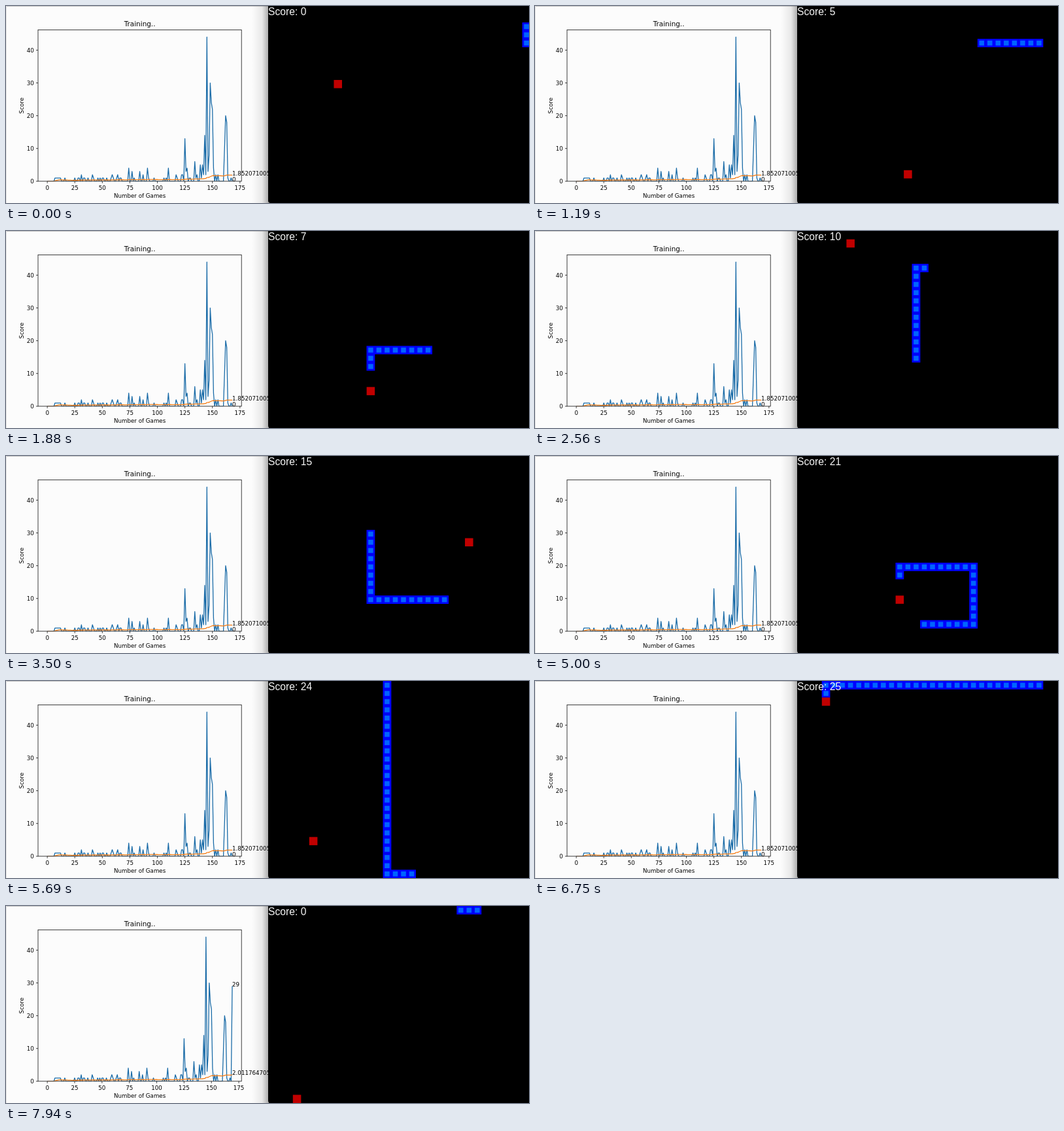
Animation of 800 by 301 pixels, one loop 8000 ms. Source, as an HTML page with a canvas:

```html
<!DOCTYPE html>
<html lang="en">
<head>
<meta charset="utf-8">
<title>Snake training</title>
<style>
  html, body { margin: 0; width: 100%; height: 100%; overflow: hidden; background: #fcfcfc; }
  canvas { display: block; width: 800px; height: 301px; }
</style>
</head>
<body>
<canvas id="stage" width="800" height="301"></canvas>
<script>
const ctx = document.getElementById('stage').getContext('2d');
const LOOP = 8000, FRAME = 62.5;
const CHART_UPDATE = 121, RESTART = 122;
const BOARD_X = 401.2, CELL = 12.535;
const AXES = { left: 49, right: 360.2, top: 36.4, bottom: 267.8 };
const SANS = '"DejaVu Sans", sans-serif';

// Scores of past games: value -> game numbers; all other games scored 0.
const SCORES = {
  1: [7, 8, 9, 10, 11, 12, 16, 25, 28, 29, 33, 34, 37, 42, 46, 48, 50, 51, 54, 58, 60, 63, 66, 67,
      79, 92, 97, 106, 108, 118, 129, 130, 135, 140, 164, 167],
  2: [31, 41, 59, 64, 87, 117, 122, 123, 136, 142, 144, 153, 155],
  3: [77, 84, 126, 146], 4: [74, 91, 110, 127, 151], 5: [139, 141], 6: [134], 8: [147],
  10: [161], 13: [125], 14: [143], 18: [163], 20: [162], 22: [150], 24: [149], 30: [148], 44: [145]
};
const history = Array(169).fill(0);
for (const [score, games] of Object.entries(SCORES)) games.forEach(g => history[g] = +score);

const DIRS = { L: [-1, 0], R: [1, 0], U: [0, -1], D: [0, 1] };

// Each run is [frames, moves]; "D7*" means seven cells down, then food.
function makeGame(body, runs, ahead) {
  const cells = [...body], meals = [], keys = [[0, cells.length - 1]];
  const follow = moves => moves.split(' ').forEach(move => {
    const [dx, dy] = DIRS[move[0]];
    for (let n = parseInt(move.slice(1)); n > 0; n--) {
      const [x, y] = cells[cells.length - 1];
      cells.push([x + dx, y + dy]);
    }
    if (move.endsWith('*')) meals.push(cells.length - 1);
  });
  for (const [frames, moves] of runs) {
    follow(moves);
    keys.push([keys[keys.length - 1][0] + frames, cells.length - 1]);
  }
  follow(ahead);

  return frame => {
    let head = keys[keys.length - 1][1];
    const next = keys.findIndex(([f]) => f > frame);
    if (next > 0) {
      const [f0, s0] = keys[next - 1], [f1, s1] = keys[next];
      head = s0 + Math.floor((s1 - s0) * (frame - f0) / (f1 - f0));
    }
    const score = meals.filter(m => m <= head).length;
    return {
      score,
      snake: cells.slice(head - score - 2, head + 1),
      food: cells[meals.find(m => m > head)]
    };
  };
}

const longGame = makeGame([[31, 4], [31, 3], [31, 2]], [
  [19, 'L23 D7* D5 R10* R6 U8* L9 D9* D2 R9* R6 U13 L8'],
  [22, 'L9 D16* R15 U6* L16 D5* D2 R13* R4 U17 L15 D11*'],
  [29, 'D1 R6 U16 L14 D1* D8 R5* R9 U3* L8 D5* D6 R8* R4 U7* L8 D9* D2 R8* R4 U21 L23'],
  [21, 'L5 D20* R9* R12 U7* L9 D4* D1 R6* R6 U18 L10 D14* D9 R3'],
  [17, 'R3 U13 L15 D9* D1 R25 U20 L27 D1'],
  [11, 'D1* D12 R16* R7 U9* L6 D7* D1']
], 'R5 D6*');
const newGame = makeGame([[14, 12], [15, 12], [16, 12]], [[5, 'R12 U12 L5']], 'L20 D23*');

function text(str, x, y, size, align = 'left', font = SANS) {
  ctx.font = `${size}px ${font}`;
  ctx.textAlign = align;
  ctx.fillText(str, x, y);
}

function line(points, color, width) {
  ctx.beginPath();
  points.forEach(([x, y]) => ctx.lineTo(x, y));
  ctx.strokeStyle = color;
  ctx.lineWidth = width;
  ctx.stroke();
}

function drawChart(scores) {
  const { left, right, top, bottom } = AXES;
  const last = scores.length - 1;
  const px = x => left + (right - left) * (x / last / 1.1 + 0.05 / 1.1);
  const py = y => bottom - (bottom - top) * y / 46.2;
  let sum = 0;
  const means = scores.map((s, i) => (sum += s) / (i + 1));
  const plot = (values, color) => line(values.map((v, i) => [px(i), py(v)]), color, 1.3);

  ctx.fillStyle = '#fcfcfc';
  ctx.fillRect(0, 0, 402, 301);
  ctx.fillStyle = '#c4c4c4';
  ctx.fillRect(0, 0, 402, 1);
  ctx.fillStyle = '#e4e4e4';
  ctx.fillRect(0, 0, 1, 301);
  const shade = ctx.createLinearGradient(376, 0, 402, 0);
  shade.addColorStop(0, 'rgba(0,0,0,0)');
  shade.addColorStop(0.6, 'rgba(0,0,0,.08)');
  shade.addColorStop(1, 'rgba(0,0,0,.33)');
  ctx.fillStyle = shade;
  ctx.fillRect(376, 0, 26, 301);

  ctx.save();
  ctx.beginPath();
  ctx.rect(left, top, right - left, bottom - top);
  ctx.clip();
  ctx.lineJoin = 'round';
  plot(scores, '#1b6ca8');
  plot(means, '#f87c12');
  ctx.restore();

  ctx.strokeStyle = '#111';
  ctx.lineWidth = 0.8;
  ctx.strokeRect(left, top, right - left, bottom - top);
  ctx.fillStyle = '#000';
  for (let x = 0; x <= 175; x += 25) {
    line([[px(x), bottom], [px(x), bottom + 3]], '#111', 0.8);
    text(x, px(x), 281, 8.71, 'center');
  }
  for (let y = 0; y <= 40; y += 10) {
    line([[left - 3, py(y)], [left, py(y)]], '#111', 0.8);
    text(y, left - 6.2, py(y) + 3.3, 8.71, 'right');
  }
  text('Training..', 204.6, 31.2, 10.45, 'center');
  text('Number of Games', 204.6, 293, 8.71, 'center');
  ctx.save();
  ctx.translate(27, 152.2);
  ctx.rotate(-Math.PI / 2);
  text('Score', 0, 0, 8.71, 'center');
  ctx.restore();
  text(scores[last], px(last), py(scores[last]), 8.71);
  text(means[last], px(last), py(means[last]), 8.71);
}

function square([col, row], color, inset = 0) {
  const size = CELL - 2 * inset;
  ctx.fillStyle = color;
  ctx.fillRect(BOARD_X + col * CELL + inset, row * CELL + 0.2 + inset, size, size);
}

function drawBoard({ score, snake, food }) {
  ctx.fillStyle = '#000';
  ctx.beginPath();
  ctx.moveTo(401, 0);
  ctx.lineTo(800, 0);
  ctx.lineTo(800, 301);
  ctx.lineTo(404, 301);
  ctx.quadraticCurveTo(401, 301, 401, 297);
  ctx.fill();
  // A slight overlap hides the seams between cells.
  snake.forEach(cell => square(cell, '#00f', -0.15));
  snake.forEach(cell => square(cell, '#0064ff', 2.5));
  square(food, '#c00000');
  ctx.fillStyle = '#f4f4f4';
  text('Score: ' + score, 401, 14.4, 15.7, 'left', '"Liberation Sans", Arial, sans-serif');
}

const start = performance.now();
let shown = -1;
function tick() {
  const time = (performance.now() - start) % LOOP;
  const frame = Math.floor((time + 2.5) / FRAME) % 128;
  if (frame !== shown) {
    shown = frame;
    drawChart(frame < CHART_UPDATE ? history : [...history, 29]);
    drawBoard(frame < RESTART ? longGame(frame) : newGame(frame - RESTART));
  }
  requestAnimationFrame(tick);
}
tick();
</script>
</body>
</html>
```
